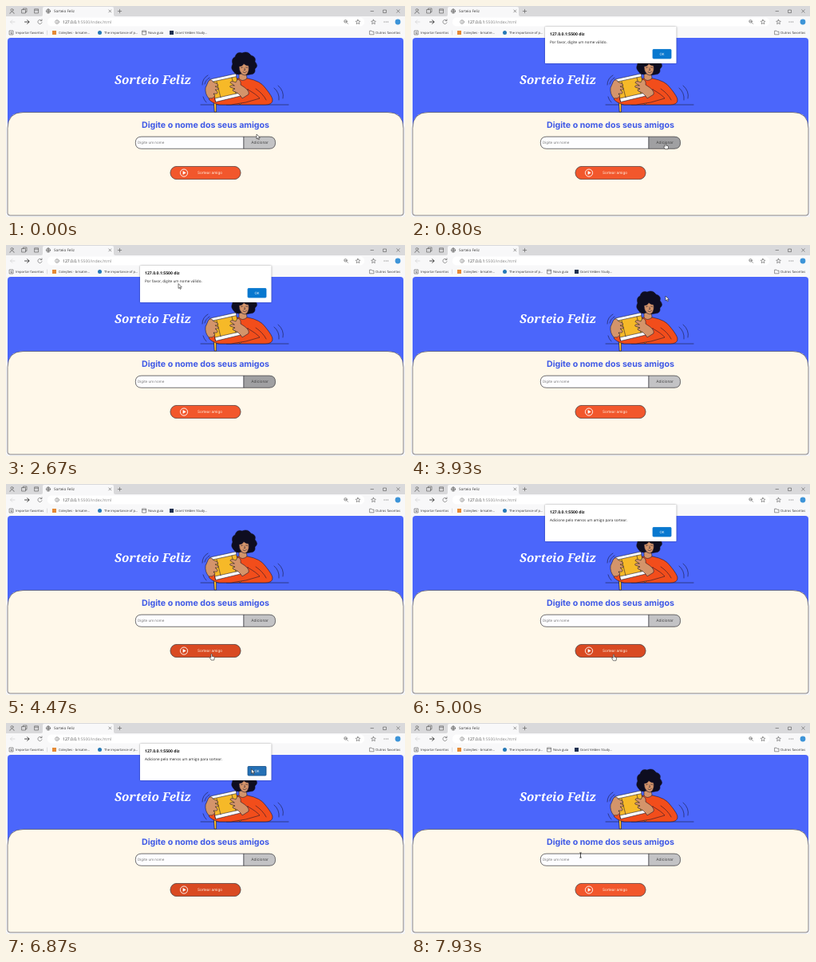
Animation, 500 px wide and 265 px high, one loop 8 s. Source, as an HTML page:

```html
<!DOCTYPE html>
<html lang="pt">
<head>
<meta charset="utf-8">
<title>Sorteio</title>
<style>
  html, body { margin: 0; width: 100%; height: 100%; overflow: hidden; background: #f4f4f5; }
  svg { display: block; width: 100vw; height: 100vh; }
  text { font: 4.6px "Open Sans", "Noto Sans", sans-serif; fill: #333; text-rendering: geometricPrecision; white-space: pre; }
  .bookmarks text { font-size: 4.15px; }
  .page text { font-family: Inter, sans-serif; }
  .page .title { font: italic bold 15.2px "Noto Serif", serif; fill: #fff; }
  .page .heading { font-size: 10.6px; font-weight: 700; fill: #3f59e6; }
  .icons { fill: none; stroke: #555; stroke-width: .6; stroke-linecap: round; stroke-linejoin: round; }
  .art { stroke: #15142b; stroke-width: .55; stroke-linejoin: round; stroke-linecap: round; }
  .control { stroke: #3a3a40; stroke-width: .6; filter: drop-shadow(.4px .8px .7px #0006); }
  .skin { fill: #d4946a; }
  .sweater { fill: #f24d1b; }
  .ribbon { fill: #f6b928; }
</style>
</head>
<body>
<svg viewBox="0 0 500 265">
  <!-- browser chrome -->
  <rect width="500" height="14" fill="#d9d9db"/>
  <path d="M44 13Q46 13 46 11V3Q46 1 48 1H133Q135 1 135 3V11Q135 13 137 13H500V40H0V13Z" fill="#f8f8f9"/>
  <rect x="52" y="14.500" width="397" height="11" rx="5" fill="#fff"/>
  <g class="icons">
    <circle cx="7.500" cy="5" r="1.500"/>
    <path d="M4.800 9.500Q5 7.300 7.500 7.300Q10 7.300 10.200 9.500M20 4.500H24.500V9H20ZM21.500 4.500V3H26V7.500H24.500M36 3.800H40.500V9H36ZM36 5.200H40.500"/>
    <circle cx="53" cy="6.500" r="2.600"/>
    <path d="M50.500 6.500H55.500M53 3.900Q51 6.500 53 9.100Q55 6.500 53 3.900M128.800 4.900L131.800 7.900M131.800 4.900L128.800 7.900M140.300 6.500H144.700M142.500 4.300V8.700M457 6.500H460.500M473 5H476.500V8.500H473ZM489.700 4.700L493.200 8.200M493.200 4.700L489.700 8.200"/>
    <path d="M11 20H5.500M7.800 17.700L5.500 20L7.800 22.300" stroke="#ccc"/>
    <path d="M44.500 18.200A2.600 2.600 0 1 0 45 20.800M45 16.800V18.600H43.200"/>
    <path d="M23.500 20H29M26.700 17.700L29 20L26.700 22.300" stroke="#222" stroke-width=".8"/>
    <circle cx="64" cy="20" r="2.400" stroke="#777"/><path d="M64 19.800V21.200M64 18.700V18.800"/>
    <circle cx="425.500" cy="19.300" r="1.800"/><path d="M426.800 20.600L428.600 22.400M424.700 19.300H426.300"/>
    <path id="star" d="M441 17.200L441.900 19L443.800 19.200L442.400 20.600L442.800 22.600L441 21.600L439.200 22.600L439.600 20.600L438.200 19.200L440.100 19Z"/>
    <use href="#star" x="19.500"/>
    <path d="M474 20H474.100M476.300 20H476.400M478.600 20H478.700" stroke-width="1"/>
    <path d="M51.500 31V36" stroke="#ccc"/>
    <path d="M4.500 31H9V36H4.500ZM6.750 32.200V34.800M5.700 33.900L6.750 34.800L7.800 33.900"/>
    <path d="M171 31H175.500V36H171ZM171 32.400H175.500"/>
    <path d="M456 31.200H458L458.800 32.200H461V35.800H456Z"/>
  </g>
  <circle cx="491" cy="20" r="3.400" fill="#3d94d8"/>
  <text x="60" y="8.300">Sorteio Feliz</text>
  <text x="71" y="21.800" style="font-size:5.05px">127.0.0.1<tspan fill="#888">:5500/index.html</tspan></text>
  <g class="bookmarks">
    <rect x="58" y="31" width="5" height="5" fill="#e58a35"/>
    <circle cx="117.500" cy="33.500" r="2.500" fill="#2779b6"/>
    <rect x="205" y="31" width="5" height="5" fill="#1d3050"/>
    <text x="12" y="35">Importar favoritos</text>
    <text x="66" y="35">Coleções - brisatre...</text>
    <text x="123" y="35">The importance of p...</text>
    <text x="178" y="35">Nova guia</text>
    <text x="212" y="35">Grant Velden Study...</text>
    <text x="463" y="35">Outros favoritos</text>
  </g>

  <!-- page -->
  <g class="page">
    <rect x="2" y="40" width="496" height="223" rx="4" fill="#4b66fb"/>
    <path d="M2 260V153.500Q2 133.500 22 133.500H478Q498 133.500 498 153.500V260Q498 263 495 263H5Q2 263 2 260Z" fill="#fff8ea" stroke="#3a3a44" stroke-width=".6"/>
    <text class="title" x="184" y="97.500" text-anchor="middle">Sorteio Feliz</text>

    <g class="art">
      <path d="M244 124H354" fill="none"/>
      <path class="sweater" d="M278 94Q283 91 290 91H303Q319 94 325 103Q334 114 334 118Q334 124 325 124H276Q271 119 272 108Z"/>
      <path class="skin" d="M292 82V91Q296 96 302 91L301 82Z"/>
      <path d="M285 82Q281 78 284 73Q282 66 287 64Q289 57 296 59Q303 56 307 62Q314 64 312 70Q317 75 312 79Q313 86 306 86Q300 88 295 85Q288 88 285 82Z" fill="#0e0d20"/>
      <path class="skin" d="M292 76Q296 76 298 72.500Q301 75 304 75Q305 81 302.500 85Q299.500 88.500 296 86Q292 82 292 76Z"/>
      <path d="M294.500 77.500L296.500 77M300.500 77L302.500 77.300M298.800 78L299.700 80.500H298.200M297 83Q299.500 85 301.500 82.500" fill="none"/>
      <path class="ribbon" d="M260.500 119H263.500V133H261.500ZM289 113L293 124L295 122L291.500 112Z"/>
      <path class="sweater" d="M303 105Q314 111 318 116Q301 122 282 124H267Q258 122 254 117L261 110Q269 116 279 115Q294 112 303 105Z"/>
      <path class="ribbon" d="M257 93L288 86L294 112L263 120Z"/>
      <path d="M256 92L288 85L289 88.500L257 95.500ZM262 116L293 109L294 113L263 120.500Z" fill="#fff"/>
      <path d="M264 95L269 115M283 90L288 110" fill="none"/>
      <path class="skin" d="M254 94Q258 91 259 95L265 98Q267 101 262 101L266 103Q267 106 262 105L265 108Q266 111 260 110L262 113Q259 117 254 116Q249 110 250 103Z"/>
      <path class="skin" d="M281 96Q282 93 288 96L290 92Q295 93 294 99Q306 106 304 111L296 116Q292 109 285 107Q282 105 287 104L281 102Q279 99 286 100Z"/>
      <path d="M253 87Q246 91 246 99M255 90Q250 93 249 98M247 114Q248 118 251 121M336 103Q343 109 342 118M341 100Q349 107 347 116M313 104Q322 110 326 118" fill="none"/>
    </g>

    <text class="heading" x="250" y="152.700" text-anchor="middle">Digite o nome dos seus amigos</text>
    <path class="control" d="M298 164.200H169.800Q162.300 164.200 162.300 171.700Q162.300 179.200 169.800 179.200H298Z" fill="#fdfdff"/>
    <path id="addButton" class="control" d="M298 164.200H330Q337.500 164.200 337.500 171.700Q337.500 179.200 330 179.200H298Z"/>
    <text x="165" y="173.300" style="font-size:4.5px;fill:#777">Digite um nome</text>
    <text x="318" y="173.300" text-anchor="middle" style="fill:#444;font-size:4.8px">Adicionar</text>
    <rect id="drawButton" class="control" x="206" y="201.400" width="88" height="16.300" rx="8.100"/>
    <circle cx="223" cy="209.600" r="4.600" fill="none" stroke="#fff" stroke-width=".9"/>
    <path d="M221.600 207.100L225.600 209.600L221.600 212.100Z" fill="#fff"/>
    <text x="255.500" y="211.300" text-anchor="middle" style="fill:#fff3e3;font-size:4.7px">Sortear amigo</text>
  </g>

  <g id="dialog">
    <rect x="168" y="26" width="164.500" height="46" rx=".8" fill="#fff" style="filter:drop-shadow(0 .4px .8px #0006)"/>
    <text x="174" y="37" style="font-size:5.1px;font-weight:700;fill:#111">127.0.0.1:5500 diz</text>
    <text id="message" x="174" y="47.300" style="font-size:4.65px;fill:#222"/>
    <rect id="okButton" x="303" y="54.500" width="23" height="11.500" rx="1" stroke-width=".8"/>
    <text x="314.500" y="62" text-anchor="middle" style="fill:#fff;font-size:4.4px">OK</text>
  </g>

  <g id="cursor" stroke="#222" stroke-width=".6" stroke-linejoin="round" fill="#fff">
    <path id="arrow" d="M0 0V6L1.400 4.800L2.400 7L3.400 6.500L2.400 4.400H4.300Z"/>
    <path id="hand" d="M-.8 0Q0-1 .7 0V2.700L3 3.200Q3.800 3.500 3.600 4.600L3 7.300H-.6L-2.500 4.300Q-2 3-.8 4Z"/>
    <path id="beam" d="M-1.300-3H1.300M0-3V3M-1.300 3H1.300" fill="none" stroke-width=".8"/>
  </g>
</svg>
<script>
const LOOP = 8000;
const $ = id => document.getElementById(id);
const within = (t, from, to) => t >= from && t < to;

// [time, x, y] of the pointer tip
const pointerPath = [
  [0, 314, 161], [70, 314, 161], [330, 319, 172.5], [1130, 319, 172.5],
  [1530, 217, 84], [1730, 217, 84], [2130, 179, 49], [2330, 179, 49],
  [2670, 216, 48.5], [2870, 253, 46], [3070, 254, 46], [3500, 300, 58],
  [3870, 319, 64], [3930, 319, 64], [4530, 256, 218], [4730, 254, 214.5],
  [5530, 254, 214.5], [5730, 250, 60], [5870, 250, 60], [6270, 248, 46],
  [6530, 248, 46], [6870, 307.5, 57.5], [7130, 314, 60], [7670, 314, 60],
  [7930, 212.5, 166], [8000, 212.5, 166]
];

function pointerAt(t) {
  const next = Math.max(1, pointerPath.findIndex(key => key[0] > t));
  const [t0, x0, y0] = pointerPath[next - 1];
  const [t1, x1, y1] = pointerPath[next];
  const u = (t - t0) / (t1 - t0);
  const eased = u * u * (3 - 2 * u);
  return [x0 + (x1 - x0) * eased, y0 + (y1 - y0) * eased];
}

function draw(t) {
  const nameAlert = within(t, 530, 3930);
  const drawAlert = within(t, 5000, 7670);
  $("dialog").style.display = nameAlert || drawAlert ? "" : "none";
  $("message").textContent = nameAlert
    ? "Por favor, digite um nome válido."
    : "Adicione pelo menos um amigo para sortear.";

  const okHover = within(t, 3600, 3930) || within(t, 6800, 7670);
  const okPressed = within(t, 3800, 3930) || within(t, 7330, 7400);
  $("okButton").setAttribute("fill", okPressed ? "#155a9c" : okHover ? "#2470b5" : "#0878cf");
  $("okButton").setAttribute("stroke", okHover ? "#164f86" : "#0878cf");
  $("addButton").setAttribute("fill", within(t, 130, 3930) ? "#a0a0a2" : "#c3c3c5");
  $("drawButton").setAttribute("fill", within(t, 4430, 7670) ? "#d94a22" : "#f2572c");

  const [x, y] = pointerAt(t);
  $("cursor").setAttribute("transform", `translate(${x} ${y})`);
  const shape = within(t, 200, 1130) || within(t, 4430, 5530) ? "hand" : t >= 7860 ? "beam" : "arrow";
  for (const id of ["arrow", "hand", "beam"]) $(id).style.display = id === shape ? "" : "none";
}

function tick(now) {
  draw(now % LOOP);
  requestAnimationFrame(tick);
}
draw(0);
requestAnimationFrame(tick);
</script>
</body>
</html>
```
